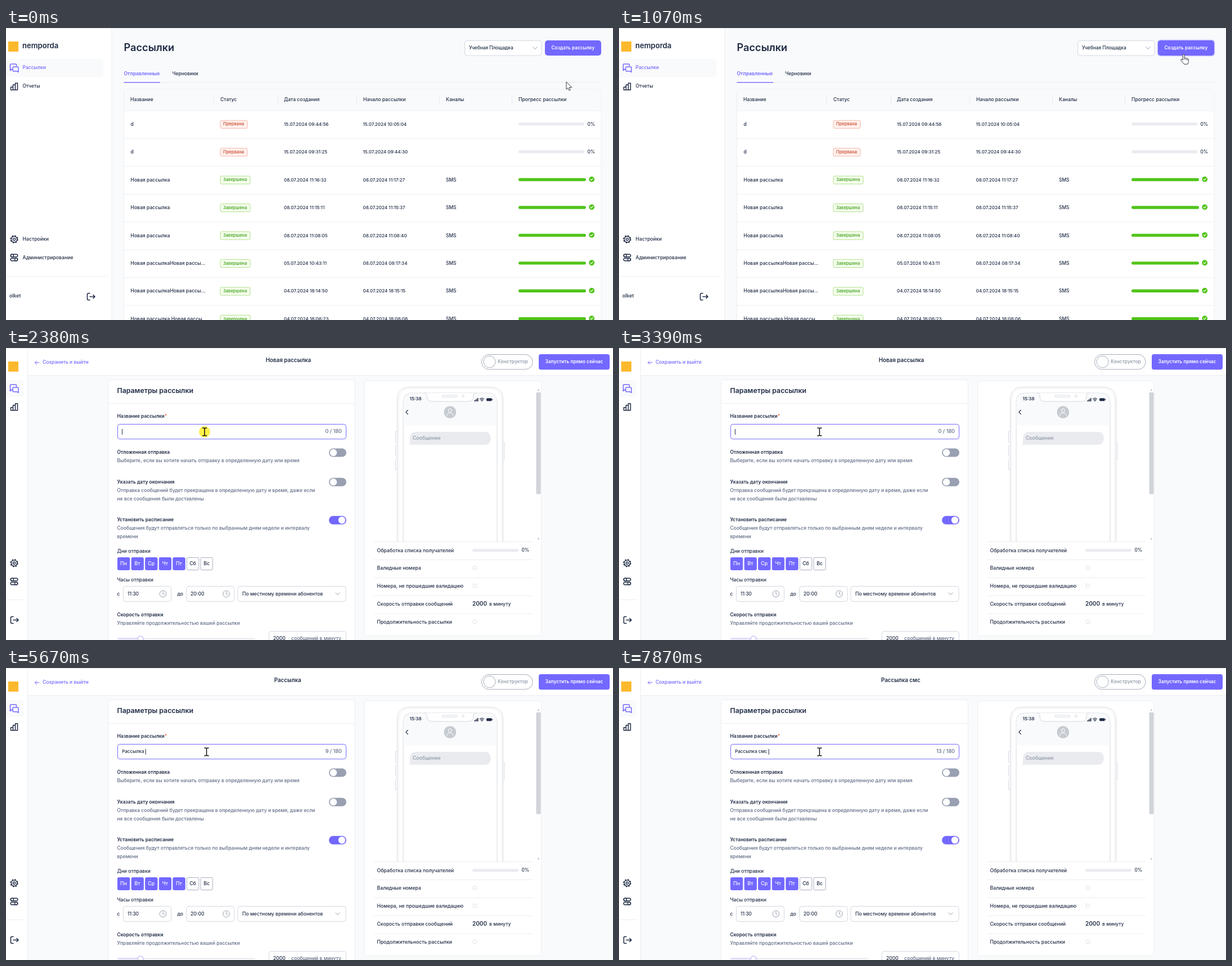
Write an HTML page that moves like this. It is 1079 px wide and 519 px high and loops after 8000 ms.

```html
<!DOCTYPE html>
<html lang="ru">
<head>
<meta charset="utf-8">
<style>
html, body { margin: 0; width: 100%; height: 100%; overflow: hidden; background: #f9fafb; }
svg { display: block; width: 100%; height: 100%; font-family: Inter, "Noto Sans", sans-serif; font-weight: 500; }
text { white-space: pre; }
</style>
</head>
<body>
<svg id="stage" viewBox="0 0 1079 519" preserveAspectRatio="none"></svg>
<script>
const INK = '#1f2b45', GREY = '#5f6b85', VIOLET = '#7368ff', LINE = '#eceef2', EDGE = '#d3d8e1', PALE = '#f9fafb';

// Drawing helpers
const text = (x, y, s, size = 8.6, fill = INK, more = '') =>
  `<text x="${x}" y="${y}" font-size="${size}" fill="${fill}" ${more}>${s}</text>`;
const bold = (x, y, s, size = 8.45, fill = INK, more = '') => text(x, y, s, size, fill, 'font-weight="600" ' + more);
const box = (x, y, w, h, r = 0, fill = '#fff', stroke = 'none', more = '') =>
  `<rect x="${x}" y="${y}" width="${w}" height="${h}" rx="${r}" fill="${fill}" stroke="${stroke}" ${more}/>`;
const path = (d, stroke = INK, w = 1, fill = 'none') =>
  `<path d="${d}" fill="${fill}" stroke="${stroke}" stroke-width="${w}" stroke-linecap="round" stroke-linejoin="round"/>`;
const dot = (x, y, r, fill = 'none', stroke = 'none', w = 1, more = '') =>
  `<circle cx="${x}" cy="${y}" r="${r}" fill="${fill}" stroke="${stroke}" stroke-width="${w}" ${more}/>`;
const hline = (x1, x2, y, c = LINE) => path(`M${x1} ${y}H${x2}`, c);
const vline = (x, y1, y2, c = LINE) => path(`M${x} ${y1}V${y2}`, c);
const group = (id, s) => `<g id="${id}">${s}</g>`;
const chevron = (x, y) => path(`M${x - 3.5} ${y - 2}l3.5 4l3.5 -4`, '#9aa2b2');

// Sidebar icons, each centred on x, y
const chat = (x, y) => path(`M${x - 5} ${y + 3}l-2 1.5v-10q0 -1.5 1.5 -1.5h8q1.5 0 1.5 1.5v2M${x - 7} ${y + 2.5}h4`, VIOLET, 1.5) +
  path(`M${x - 1} ${y - 2}h7q1.5 0 1.5 1.5v8l-2.5 -1.8h-6q-1.5 0 -1.5 -1.5v-4.7q0 -1.5 1.5 -1.5z`, VIOLET, 1.5);
const chart = (x, y) => path(`M${x - 6} ${y + 6}v-5h4v5zM${x - 2} ${y + 6}v-9h4v9zM${x + 2} ${y + 6}v-12h4v12z`, INK, 1.5);
const gear = (x, y) => dot(x, y, 6.3, 'none', INK, 1.7, 'stroke-dasharray="2.5 2.45"') + dot(x, y, 5.2, 'none', INK, 1.4) + dot(x, y, 2.1, 'none', INK, 1.4);
const sliders = (x, y) => box(x - 6.3, y - 5.8, 12.6, 4.6, 2.3, 'none', INK, 'stroke-width="1.4"') +
  box(x - 6.3, y + 1.2, 12.6, 4.6, 2.3, 'none', INK, 'stroke-width="1.4"') +
  dot(x - 3.5, y - 3.5, 2.4, '#fff', INK, 1.4) + dot(x + 3.5, y + 3.5, 2.4, '#fff', INK, 1.4);
const exit = (x, y) => path(`M${x - 2} ${y - 6}h-2.5q-2 0 -2 2v8q0 2 2 2h2.5M${x - 2} ${y}h9M${x + 4} ${y - 3}l3 3l-3 3`, INK, 1.6);
const logo = box(4, 24, 18, 18, 0, '#fdb92d');

// List page
const rows = [
  ['d', '15.07.2024 09:44:56', '15.07.2024 10:05:04'],
  ['d', '15.07.2024 09:31:25', '15.07.2024 09:44:30'],
  ['Новая рассылка', '08.07.2024 11:16:32', '08.07.2024 11:17:27'],
  ['Новая рассылка', '08.07.2024 11:15:11', '08.07.2024 11:15:37'],
  ['Новая рассылка', '08.07.2024 11:08:05', '08.07.2024 11:08:40'],
  ['Новая рассылкаНовая рассы...', '05.07.2024 10:43:11', '08.07.2024 08:17:34'],
  ['Новая рассылкаНовая рассы...', '04.07.2024 18:14:50', '04.07.2024 18:15:15'],
  ['Новая рассылка Новая рассы', '04.07.2024 18:06:23', '04.07.2024 18:08:06']
];
const columns = [[221, 'Название'], [381, 'Статус'], [494, 'Дата создания'],
  [635, 'Начало рассылки'], [782, 'Каналы'], [911, 'Прогресс рассылки']];

function tableRow([name, made, start], i) {
  const top = 147 + i * 49.45, base = top + 26.7, done = i > 1;
  const tag = done
    ? box(381, top + 17.3, 53, 14, 2, '#f6ffed', '#b0e08c') + text(386, top + 26.4, 'Завершена', 7.6, '#399c16')
    : box(381, top + 17.3, 48, 14, 2, '#fff1ee', '#f5b9ab') + text(386, top + 26.4, 'Прервана', 7.6, '#c8472c');
  const progress = done
    ? box(911, top + 20.9, 120, 5.4, 2.7, '#52c41a') + dot(1041.2, top + 23, 4.9, '#52c41a') +
      path(`M1039 ${top + 23.1}l1.6 1.6l2.8 -3.2`, '#fff', 1.1) + text(782, base, 'SMS', 8.4)
    : box(911, top + 20.9, 117, 5.4, 2.7, '#ebebf1') + text(1033.5, base, '0%', 8.3);
  return hline(210, 1058, top) + text(221.5, base, name) + tag +
    text(494, base, made, 8.05) + text(634.5, base, start, 8.05) + progress;
}

const listPage =
  box(0, 0, 1079, 519, 0, PALE) + box(0, 0, 188, 519) + vline(188, 0, 519, '#e9ecf0') +
  logo + bold(29, 35.5, 'nemporda', 13.1) +
  box(-5, 55, 178, 32, 4, PALE) + chat(14.5, 71) + text(29.5, 73, 'Рассылки', 8.5, VIOLET) +
  chart(14.5, 104) + text(29.5, 106, 'Отчеты', 8.5) +
  gear(14.5, 375.5) + text(29.5, 377.7, 'Настройки', 8.7) +
  sliders(14.5, 408) + text(29.5, 410.7, 'Администрирование', 8.7) +
  hline(0, 180, 441.5) + text(6, 479, 'olket', 8.8) + exit(151, 477.5) +
  bold(209.5, 40.5, 'Рассылки', 18.2) +
  box(815.5, 22.5, 136.5, 26.5, 4, '#fff', EDGE) + text(823, 38.2, 'Учебная Площадка', 8.3) + chevron(940.5, 35.7) +
  group('ring', box(956.5, 20.5, 103, 30, 6, '#cfcbff')) + box(958, 22, 100, 27, 5, VIOLET) +
  bold(1008, 38, 'Создать рассылку', 8.25, '#fff', 'text-anchor="middle"') +
  bold(209.5, 84, 'Отправленные', 8.6, VIOLET) + text(295.5, 84, 'Черновики', 8.5) +
  hline(210, 1058, 96.7) + box(209.5, 96, 64.5, 1.4, 0, VIOLET) +
  box(209.5, 109, 848.5, 440, 4, '#fff', LINE) + box(210, 109.5, 847.5, 37, 3, PALE) +
  columns.map(([x, s]) => text(x, 130, s)).join('') +
  [369, 483.5, 623.5, 770.5, 899.5].map(x => vline(x, 119, 136, '#e8eaef')).join('') +
  rows.map(tableRow).join('') + hline(0, 1079, 0.5, '#e8eaee');

// Form page
const shell = box(0, 0, 1079, 519, 0, PALE) + box(0, 0, 38, 519) + vline(38.5, 0, 519, '#e9ecf0') +
  logo + hline(0, 31, 447.5) + hline(0, 1079, 0.5, '#e8eaee');

const toggle = (y, on) => box(574, y - 7.5, 31, 15, 7.5, on ? VIOLET : '#98a0b1') + dot(on ? 597 : 582, y, 6.2, '#fff');
const clock = (x, y) => dot(x, y, 5.8, 'none', '#98a0b1') + path(`M${x} ${y - 3.5}v3.7l2.6 1.4`, '#98a0b1');
const field = (x, y, w, h = 27) => box(x, y, w, h, 4, '#fff', EDGE);
const days = ['Пн', 'Вт', 'Ср', 'Чт', 'Пт', 'Сб', 'Вс'].map((d, i) => {
  const x = 198 + i * 24.6, on = i < 5;
  return box(x + .5, 372.5, 21.3, 22, 2, on ? VIOLET : '#fff', on ? VIOLET : '#a9b0be') +
    text(x + 11, 386, d, 8.8, on ? '#fff' : INK, 'text-anchor="middle"');
}).join('');

const settings =
  box(181.5, 56.5, 439, 480, 5, '#fff', LINE) + bold(197.5, 80, 'Параметры рассылки', 12.3) + hline(182, 620, 98.3) +
  bold(197.5, 124, 'Название рассылки<tspan fill="#f2663d">*</tspan>') +
  box(198.5, 135.5, 406, 26.3, 4, '#fff', EDGE, 'id="nameBox"') +
  text(206, 150.7, '', 8.2, INK, 'id="nameText"') + box(206, 144, 1, 10, 0, INK, 'none', 'id="caret"') +
  text(597, 150.7, '', 9.1, GREY, 'id="count" text-anchor="end"') +
  bold(197.5, 188, 'Отложенная отправка') + toggle(186, false) +
  text(197.5, 203, 'Выберите, если вы хотите начать отправку в определенную дату или время', 8.55, GREY) +
  bold(197.5, 240.5, 'Указать дату окончания') + toggle(238.3, false) +
  text(197.5, 255.5, 'Отправка сообщений будет прекращена в определенную дату и время, даже если', 8.55, GREY) +
  text(197.5, 270.5, 'не все сообщения были доставлены', 8.55, GREY) +
  bold(197.5, 308, 'Установить расписание') + toggle(306, true) +
  text(197.5, 323, 'Сообщения будут отправляться только по выбранным дням недели и интервалу', 8.55, GREY) +
  text(197.5, 338, 'времени', 8.55, GREY) +
  text(197.5, 364, 'Дни отправки') + days + text(197.5, 415, 'Часы отправки') +
  text(197.5, 440, 'с') + field(208.5, 423.5, 85) + text(216, 439.6, '11:30', 8.3) + clock(279, 437) +
  text(304.5, 440, 'до') + field(321, 423.5, 85) + text(328, 439.6, '20:00') + clock(391.5, 437) +
  field(412, 423.5, 192) + text(420, 439.8, 'По местному времени абонентов') + chevron(589.5, 437) +
  bold(197.5, 476.5, 'Скорость отправки') + text(197.5, 492, 'Управляйте продолжительностью вашей рассылки', 8.55, GREY) +
  box(198, 515.2, 245, 2.6, 1.3, '#ececf2') + box(198, 515.2, 41, 2.6, 1.3, '#dcd9ff') + dot(239, 517, 5, '#fff', '#c9c5fa', 1.5) +
  field(467.5, 503.5, 137, 30) + text(475, 519, '2000', 8.5) + text(507, 519, 'сообщений в минуту', 8.6, GREY);

const phone =
  path('M695.5 344V93q0 -23.5 23.5 -23.5h141q23.5 0 23.5 23.5V344', '#d5d8de') +
  path('M698 344V94q0 -22 22 -22h139q22 0 22 22V344', '#e6e8ec', .8) +
  path('M706 344V97q0 -17 17 -17h133q17 0 17 17V344', '#d5d8de') +
  path('M706.5 138V97q0 -16.5 16.5 -16.5h133q16.5 0 16.5 16.5V138z', 'none', 0, PALE) +
  path('M744 80q4 0 4 4v2q0 9 9 9h65q9 0 9 -9v-2q0 -4 4 -4', '#d5d8de', 1, '#fff') +
  box(775, 84, 27, 3.2, 1.6, '#fff', '#d5d8de') + dot(812.5, 85.5, 1.8, '#fff', '#d5d8de') +
  [148, 172.5, 197.5].map(y => box(692.5, y, 3, 19.5, 1, '#fff', '#d5d8de')).join('') +
  box(883.5, 167, 2.5, 31, 1, '#fff', '#d5d8de') + bold(717.5, 93.2, '15:38', 8) +
  [0, 1, 2, 3].map(i => box(832 + i * 2, 93 - i * 1.4, 1.4, 2 + i * 1.4, .4, INK)).join('') +
  path('M842.5 90.6q3.5 -3 7 0M844 92.5q2 -1.6 4 0', INK, 1.2) + dot(846, 94, .9, INK) +
  box(854, 89.2, 9.6, 5, 1.4, INK) + box(864, 90.6, 1, 2.2, .5, INK) +
  path('M714.3 110.5l-3.5 3.6l3.5 3.6', INK, 1.2) +
  dot(789.3, 114, 10.8, '#c7cbd2') + dot(789.3, 111, 3, 'none', '#fff') + path('M783.5 120q0 -4.5 5.8 -4.5t5.8 4.5', '#fff') +
  path('M716 172q2.2 -2 2.2 -6v-5.5q0 -11.5 11.5 -11.5h120.5q11.5 0 11.5 11.5t-11.5 11.5z', 'none', 0, '#e9ebef') +
  text(723, 163, 'Сообщение', 8.6, '#8f97a6') +
  box(942.5, 79, 8, 180.5, 0, '#d0d3d8') +
  path('M944.5 75.5l2 -2l2 2z', 'none', 0, '#a3a6ab') + path('M944.5 338.5l2 2l2 -2z', 'none', 0, '#a3a6ab');

const summary = ['Обработка списка получателей', 'Валидные номера', 'Номера, не прошедшие валидацию',
  'Скорость отправки сообщений', 'Продолжительность рассылки'].map((s, i) => {
    const y = 344.5 + i * 31.9, waiting = i % 3 > 0;
    return hline(654, 936, y) + text(659.5, y + 18, s, 8.7) + (waiting ? dot(833.3, y + 14.3, 3.5, '#fff', '#dde0e6') : '');
  }).join('') + box(829, 357, 82, 5.2, 2.6, '#ebebf1') + text(916.5, 361.5, '0%', 8.3) +
  bold(829, 458, '2000', 10) + text(859, 458, 'в минуту');

const form =
  box(-5, 57, 36, 30, 4, PALE) + chat(14.5, 72) + chart(14.5, 104.7) + gear(14.5, 382.3) + sliders(14.5, 415) + exit(15, 483.5) +
  box(39, 1, 1040, 47.5) + hline(39, 1079, 48.7) +
  path('M59 26H51.5M54.5 23l-3 3l3 3', VIOLET) + text(65, 28, 'Сохранить и выйти', 8.6, VIOLET) +
  bold(502, 25, '', 9.8, INK, 'id="title" text-anchor="middle"') +
  box(845.5, 11.5, 90.5, 26.5, 13.2, '#fff', '#a5acba') + dot(859.5, 24.5, 10.5, '#fff', '#a5acba') +
  text(874, 27.3, 'Конструктор', 8.5, '#8b94a6') +
  box(947, 11, 126, 27.5, 4, VIOLET) + bold(1010, 26.7, 'Запустить прямо сейчас', 8.3, '#fff', 'text-anchor="middle"') +
  settings + box(637.5, 58, 314, 453.5, 5, '#fff', LINE) + phone + summary;

// Pointers, each with its hot spot at 0,0
const pointers =
  group('arrow', path('M0 0V13.2L3 10.4L5 15L7.2 14L5.2 9.6H9.3z', '#25283a', .9, '#fff')) +
  group('hand', path('M-1.5 9.5V1q0 -1.5 1.4 -1.5t1.4 1.5V6q2.2 -.8 2.7 .6q2 -.6 2.5 .8q2.2 -.5 2.2 1.6v3.5l-1.6 4.5h-6.5l-5 -6.5q-1.4 -2.2 .2 -2.5z', '#25283a', .9, '#fff') +
    path('M1.3 6V9M4 7V9.5M6.5 8V10', '#25283a', .8)) +
  group('beam', path('M-3.5 -7q3.5 0 3.5 1.5q0 -1.5 3.5 -1.5M0 -5.5V5.5M-3.5 7q3.5 0 3.5 -1.5q0 1.5 3.5 1.5', '#111', 1.5));

const stage = document.getElementById('stage');
stage.innerHTML = group('list', listPage) + group('shell', shell) + group('form', form) +
  group('pointer', dot(0, 0, 10, '#fff04a', 'none', 0, 'id="click"') + pointers);
const el = id => document.getElementById(id);
const show = (id, on) => el(id).setAttribute('visibility', on ? 'visible' : 'hidden');

const LOOP = 8000, LEAVE = 1130, LOADED = 1400, FOCUS = 2330, BLINK = 530;
const NAME = 'Рассылка смс ';
const keyTimes = [3530, 4200, 4530, 4670, 5070, 5200, 5330, 5530, 5670, 6330, 6460, 6530, 6790];
const track = [[70, 996, 96], [400, 1000, 76], [720, 1003, 48], [1200, 1004, 47], [1650, 1004, 47],
  [1880, 770, 115], [2100, 420, 165], [2270, 353, 149], [2420, 353, 149], [2520, 356.5, 149]];

function pointerAt(t) {
  const n = track.findIndex(k => k[0] > t);
  if (n < 1) return (n ? track[track.length - 1] : track[0]).slice(1);
  const [a, b] = [track[n - 1], track[n]], p = (t - a[0]) / (b[0] - a[0]);
  return [a[1] + (b[1] - a[1]) * p, a[2] + (b[2] - a[2]) * p];
}

function draw(t) {
  const loaded = t >= LOADED, left = t >= LEAVE, focus = t >= FOCUS;
  show('list', !left);
  show('shell', left);
  show('form', loaded);
  show('ring', !left && t >= 760);

  const typed = keyTimes.filter(k => k <= t), n = typed.length, value = NAME.slice(0, n);
  el('title').textContent = value || 'Новая рассылка';
  el('nameText').textContent = value;
  el('count').textContent = n + ' / 180';
  el('nameBox').setAttribute('stroke', focus ? VIOLET : EDGE);
  const since = t - (n ? typed[n - 1] : FOCUS);
  show('caret', focus && Math.floor(since / BLINK) % 2 == 0);
  el('caret').setAttribute('x', 206 + (n ? el('nameText').getComputedTextLength() : 0));

  const [x, y] = pointerAt(t);
  const beam = loaded && x < 605 && y > 135 && y < 162, hand = !left && y < 50;
  el('pointer').setAttribute('transform', `translate(${x} ${y})`);
  show('beam', beam);
  show('hand', hand);
  show('arrow', !beam && !hand);
  show('click', t >= 740 && t < 900 || t >= 2270 && t < 2450);
}

function tick(now) {
  draw(now % LOOP);
  requestAnimationFrame(tick);
}
draw(0);
requestAnimationFrame(tick);
</script>
</body>
</html>
```
